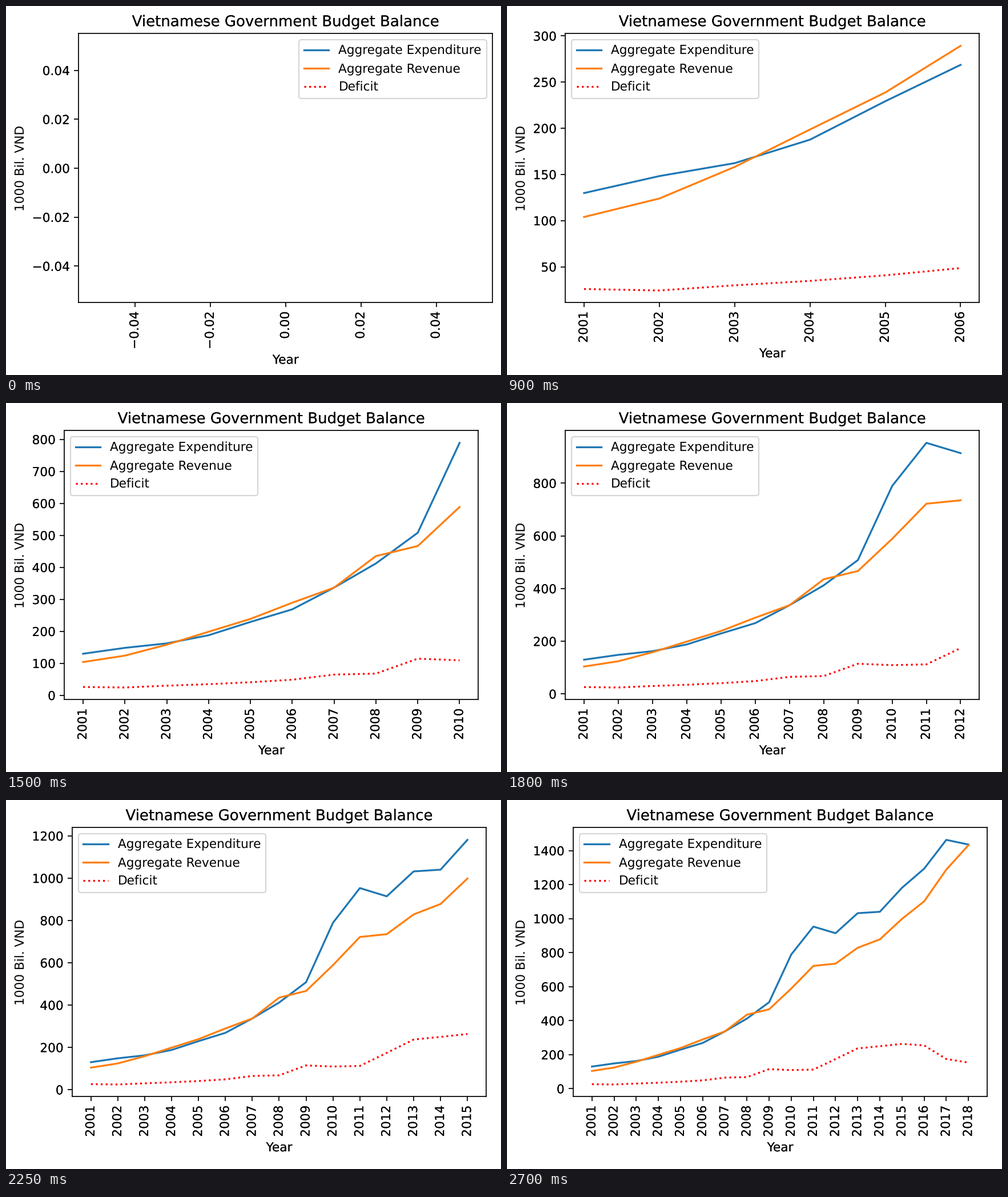
Animation, 867 px wide and 646 px high, one loop 2.85 s. Source, as a matplotlib script:

```python
import matplotlib.pyplot as plt
from matplotlib import patheffects
from matplotlib.animation import FuncAnimation

WIDTH, HEIGHT, DPI = 867, 646, 156
AXES_W, AXES_H = 4.65 * DPI, 3.02 * DPI
PAD = 0.1 * DPI
FIRST_YEAR = 2001

EXPENDITURE = [129.8, 148.2, 162.2, 187.6, 229.2, 268.6, 336.5, 412, 508,
               789, 953, 914, 1031.8, 1040, 1181, 1293.5, 1463, 1435.4]
REVENUE = [103.9, 123.9, 158.1, 198.6, 238.7, 289.2, 336.4, 435, 466.5,
           588.5, 721.8, 735, 828.4, 877.7, 998.2, 1101.4, 1288, 1431.7]
DEFICIT = [25.9, 24.3, 29.9, 34.7, 40.7, 48.6, 64.6, 67.7, 114.4,
           109.2, 112, 173.8, 236.8, 249.4, 263.1, 254.3, 174.3, 153.1]

plt.rcParams.update({
    "font.family": "DejaVu Sans",
    "font.size": 10,
    "text.hinting": "none",
})

fig = plt.figure(figsize=(WIDTH / DPI, HEIGHT / DPI), dpi=DPI, facecolor="white")
ax = fig.add_axes([0.1, 0.2, AXES_W / WIDTH, AXES_H / HEIGHT])


def place(left, bottom):
    ax.set_position([left / WIDTH, bottom / HEIGHT,
                     AXES_W / WIDTH, AXES_H / HEIGHT])


def fit_to_corner():
    """Move the axes so labels and title sit one pad from the top left."""
    left, bottom = 120, HEIGHT - 48 - AXES_H
    place(left, bottom)
    box = ax.get_tightbbox()
    place(left + PAD - box.x0, bottom + HEIGHT - PAD - box.y1)


def darken_labels():
    # Drawing the glyphs twice gives the outer labels crisper edges.
    twice = [patheffects.Normal(), patheffects.Normal()]
    labels = ax.get_xticklabels() + ax.get_yticklabels()
    for label in labels + [ax.title, ax.xaxis.label]:
        label.set_path_effects(twice)


def update(count):
    ax.clear()
    years = range(count)
    ax.plot(years, EXPENDITURE[:count], label="Aggregate Expenditure")
    ax.plot(years, REVENUE[:count], label="Aggregate Revenue")
    ax.plot(years, DEFICIT[:count], "r:", label="Deficit")
    if count:
        ax.set_xticks(years, [str(FIRST_YEAR + i) for i in years])
    ax.tick_params(axis="x", labelrotation=90)
    ax.set_title("Vietnamese Government Budget Balance")
    ax.set_xlabel("Year")
    ax.set_ylabel("1000 Bil. VND")
    ax.legend(loc="best")
    fit_to_corner()
    darken_labels()
    return []


anim = FuncAnimation(fig, update, frames=len(EXPENDITURE) + 1, interval=150,
                     init_func=lambda: [], repeat=True, repeat_delay=0)
plt.show()
```
